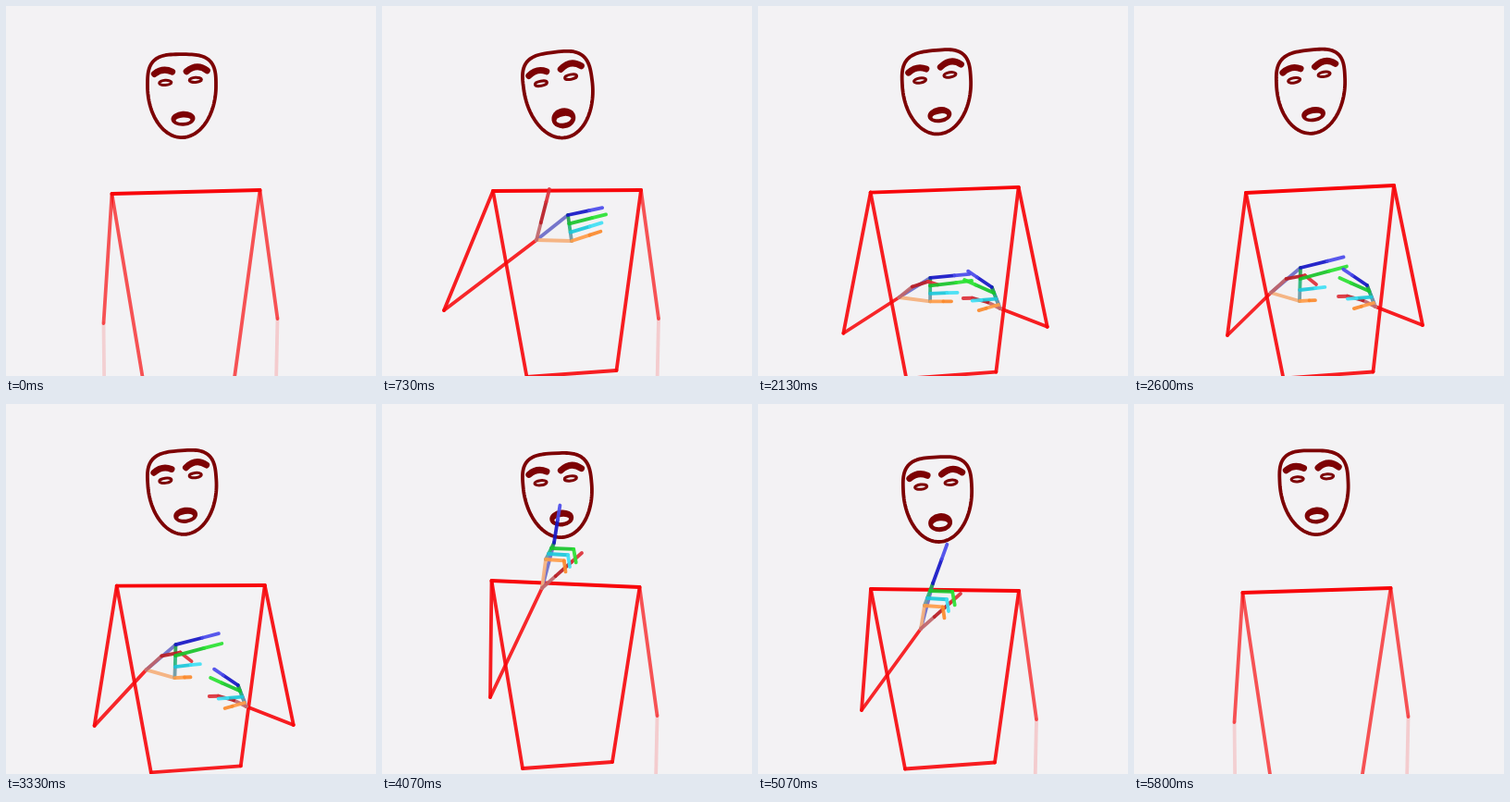
Write an HTML page with a canvas that moves like this. It is 400x400 px and loops after 5.87 s.

```html
<!DOCTYPE html>
<html lang="en">
<head>
<meta charset="utf-8">
<title>Signing figure</title>
<style>
html, body { margin: 0; width: 100%; height: 100%; overflow: hidden; background: #f3f2f4; }
canvas { display: block; width: 400px; height: 400px; }
</style>
</head>
<body>
<canvas id="stage" width="400" height="400"></canvas>
<script>
const ctx = document.getElementById('stage').getContext('2d');
const LOOP = 5870;
const PAPER = '#f3f2f4';
const INK = '#7d0204';

const lerp = (a, b, s) => a + (b - a) * s;
const smooth = (from, to, t) => {
  const s = Math.min(1, Math.max(0, (t - from) / (to - from)));
  return s * s * (3 - 2 * s);
};
const blend = (a, b, s) => Object.fromEntries(Object.keys(a).map(k => [k, lerp(a[k], b[k], s)]));
const add = ([x, y], dx, dy) => [x + dx, y + dy];
const between = (a, b, s) => [lerp(a[0], b[0], s), lerp(a[1], b[1], s)];

// Eases between [time, pose] pairs.
const track = (...keys) => t => {
  const i = keys.findIndex(k => k[0] > t);
  if (i === 0) return keys[0][1];
  if (i < 0) return keys[keys.length - 1][1];
  const [a, b] = [keys[i - 1], keys[i]];
  return blend(a[1], b[1], smooth(a[0], b[0], t));
};

// Middle of the shoulders, their tilt, and the middle of the hips
const body = track(
  [0, { x: 194.5, y: 201, tilt: -4, hx: 198, hy: 409 }],
  [730, { x: 200, y: 199.5, tilt: -1, hx: 205, hy: 397.5 }],
  [1600, { x: 202.5, y: 199.5, tilt: -3, hx: 207.5, hy: 399.5 }],
  [2600, { x: 201, y: 198, tilt: -8, hx: 210, hy: 399 }],
  [4070, { x: 198.5, y: 194.5, tilt: 7, hx: 200.5, hy: 390.5 }],
  [5070, { x: 202, y: 201, tilt: 2, hx: 207.5, hy: 391 }],
  [5800, { x: 197.5, y: 201.5, tilt: -5, hx: 197.5, hy: 410 }]);

// Elbow and wrist of the signing arm
const arm = track(
  [730, { ex: 67, ey: 329, wx: 167, wy: 253 }],
  [1600, { ex: 82, ey: 351, wx: 158, wy: 321 }],
  [2600, { ex: 101, ey: 356, wx: 148, wy: 310 }],
  [3500, { ex: 95, ey: 347, wx: 152, wy: 285 }],
  [4070, { ex: 117, ey: 317, wx: 173, wy: 199 }],
  [5070, { ex: 112, ey: 331, wx: 176, wy: 243 }]);

const face = track(
  [0, { x: 190, y: 96.5, skew: 0, lean: 0, mouth: 8 }],
  [730, { x: 191.5, y: 95.5, skew: -4.5, lean: 6, mouth: 11 }],
  [1600, { x: 196, y: 93, skew: -3, lean: 3, mouth: 9 }],
  [2600, { x: 191.5, y: 92, skew: -4, lean: 2, mouth: 8 }],
  [4070, { x: 190.5, y: 98, skew: -2, lean: 4, mouth: 9 }],
  [5070, { x: 194.5, y: 102.5, skew: -2, lean: 2, mouth: 10 }],
  [5800, { x: 195, y: 95, skew: 0, lean: 2, mouth: 9 }]);

// Hands from the wrist: index and pinky knuckles, index aim and reach,
// angles and lengths of the middle finger and pinky, their bend, thumb tip and bow
const OPEN = { ix: 34, iy: -27, px: 38, py: 1, aim: -12, reach: 38,
  midAim: -14, pinkyAim: -18, mid: 41, pinky: 33, bend: 0, tx: 14, ty: -55, bow: 0 };
const FLAT = { ix: 36, iy: -13, px: 37, py: -2, aim: 6, reach: 35,
  midAim: 4, pinkyAim: 4, mid: 36, pinky: 31, bend: 0, tx: 32, ty: -20, bow: 0 };
const SPREAD = { ix: 32, iy: -27, px: 31, py: 9, aim: -14, reach: 48,
  midAim: -15, pinkyAim: -3, mid: 52, pinky: 17, bend: 0, tx: 49, ty: -9, bow: -12 };
const POINT = { ix: 13, iy: -49, px: 4, py: -31, aim: -81, reach: 41,
  midAim: 2, pinkyAim: 4, mid: 39, pinky: 32, bend: 78, tx: 43, ty: -38, bow: 0 };
const TILT = { ...POINT, py: -25, aim: -70, reach: 45 };
const CURL = { ix: -9, iy: -23, px: -2, py: -4, aim: -146, reach: 31,
  midAim: -156, pinkyAim: -196, mid: 35, pinky: 22, bend: 0, tx: -40, ty: -11, bow: -3 };
const hand = track([900, OPEN], [1500, FLAT], [1800, FLAT], [2400, SPREAD], [3300, SPREAD],
  [3900, POINT], [4400, POINT], [5000, TILT]);

const FINGERS = [['#b81c24', '#dc3038'], ['#1616c6', '#4a4aea'], ['#18c42a', '#2ae232'],
  ['#1cc8da', '#40e0f4'], ['#ff9c48', '#fb8a2c']];
const KNUCKLES = ['#28a04c', '#28b478', '#6a98a4'];

function line(a, b, color) {
  ctx.strokeStyle = color;
  ctx.lineWidth = 3.8;
  ctx.beginPath();
  ctx.moveTo(...a);
  ctx.lineTo(...b);
  ctx.stroke();
}

const limb = (a, b, alpha) => line(a, b, `rgba(248,6,10,${alpha})`);

function oval([x, y], rx, ry, angle) {
  ctx.beginPath();
  ctx.ellipse(x, y, rx, ry, angle, 0, Math.PI * 2);
}

function drawFace(t) {
  const { x, y, skew, lean, mouth } = face(t);
  const w = 37, h = 42 + mouth * .4;
  const at = (u, v) => [x + u * w + v * lean, y + v * h + u * skew];
  const angle = Math.atan2(skew, w) - .06;
  ctx.strokeStyle = ctx.fillStyle = INK;

  // Square forehead above, round chin below
  ctx.lineWidth = 3.8;
  ctx.beginPath();
  for (let a = 0; a < Math.PI * 2; a += .05) {
    const c = Math.cos(a), s = Math.sin(a), top = s < 0;
    const p = top ? .62 : 1;
    ctx.lineTo(...at(Math.sign(c) * Math.abs(c) ** p, -.22 + (top ? -.76 * (-s) ** p : 1.23 * s)));
  }
  ctx.closePath();
  ctx.stroke();

  const brow = (from, peak, to) => {
    ctx.lineWidth = 7;
    ctx.beginPath();
    ctx.moveTo(...from);
    ctx.quadraticCurveTo(...peak, ...to);
    ctx.stroke();
  };
  brow(at(-.8, -.51), at(-.55, -.67), at(-.28, -.56));
  brow(at(.14, -.57), at(.45, -.78), at(.74, -.59));

  ctx.lineWidth = 3;
  for (const eye of [at(-.48, -.3), at(.4, -.367)]) {
    oval(eye, 6.6, 2.6, angle);
    ctx.stroke();
  }
  const lips = at(.04, .56);
  oval(lips, 13, mouth, angle);
  ctx.fill();
  ctx.fillStyle = PAPER;
  oval(add(lips, 0, 1.5), 8, mouth * .34, angle);
  ctx.fill();
}

function drawHand(wrist, p) {
  const chain = (points, colors) => colors.forEach((c, i) => line(points[i], points[i + 1], c));
  const step = (from, length, deg) =>
    add(from, length * Math.cos(deg * Math.PI / 180), length * Math.sin(deg * Math.PI / 180));
  const index = add(wrist, p.ix, p.iy), pinky = add(wrist, p.px, p.py);
  const knuckles = [0, 1, 2, 3].map(i => between(index, pinky, i / 3));
  const tip = add(wrist, p.tx, p.ty);

  ctx.globalAlpha = .92;
  line(wrist, index, '#6c6cc8');
  line(wrist, pinky, '#f6b07c');
  chain(knuckles, KNUCKLES);
  const joint = s => add(between(wrist, tip, s), 0, p.bow);
  chain([wrist, joint(.34), joint(.75), tip], ['#c06468', ...FINGERS[0]]);
  knuckles.forEach((base, i) => {
    const s = Math.sqrt(Math.max(0, i - 1) / 2);
    const aim = i ? lerp(p.midAim, p.pinkyAim, s) : p.aim;
    const length = i ? lerp(p.mid, p.pinky, s) : p.reach;
    const middle = step(base, length * .62, aim);
    chain([base, middle, step(middle, length * .38, aim + (i ? p.bend : 0))], FINGERS[i + 1]);
  });
  ctx.globalAlpha = 1;
}

function draw(t) {
  ctx.fillStyle = PAPER;
  ctx.fillRect(0, 0, 400, 400);
  ctx.lineCap = ctx.lineJoin = 'round';

  const b = body(t), a = arm(t);
  const left = smooth(70, 500, t) - smooth(5250, 5600, t);
  const right = smooth(1300, 2150, t) - smooth(3450, 3850, t);
  const flare = s => 50 * s * s * (1 - s);

  const sl = [b.x - 80, b.y - b.tilt / 2], sr = [b.x + 80, b.y + b.tilt / 2];
  const hl = [b.hx - 48.5, b.hy + 3.5], hr = [b.hx + 48.5, b.hy - 3.5];
  const restL = add(sl, -9, 140);
  const el = add(between(restL, [a.ex, a.ey], left), -flare(left), 0);
  const wl = between(add(restL, 1, 90), [a.wx, a.wy], left);
  const er = add(sr, 19 + 12 * right + flare(right), 139 + 12 * right);
  const wr = add(er, lerp(-2, -51, right), lerp(95, -20, right));

  drawFace(t);
  const core = .68 + .22 * left;
  limb(el, wl, .14 + .72 * left);
  limb(er, wr, .16 + .74 * right);
  limb(sl, hl, core);
  limb(sr, hr, core);
  limb(hl, hr, core);
  limb(sl, el, core);
  limb(sr, er, .68 + .24 * right);
  limb(sl, sr, 1);
  if (left > .35) drawHand(wl, hand(t));
  if (right > .5) drawHand(wr, CURL);
}

// Fifteen pictures a second, each starting on a whole hundredth
const start = k => Math.round(k * 20 / 3) * 10;

function tick(now) {
  const t = now % LOOP;
  let k = Math.round(t * .015) + 1;
  while (start(k) > t) k--;
  draw(start(k));
  requestAnimationFrame(tick);
}

tick(0);
</script>
</body>
</html>
```
